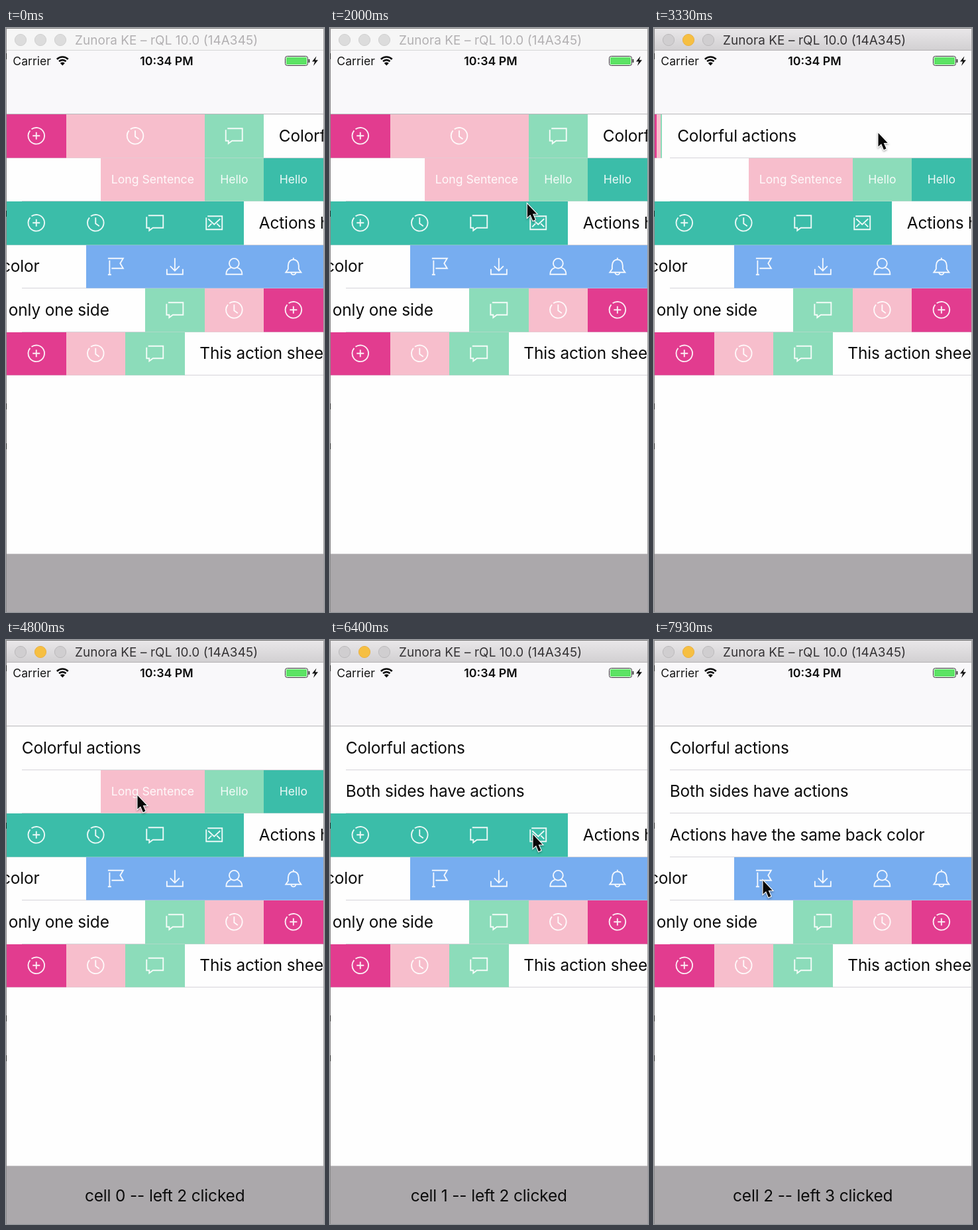
An HTML page with a canvas that plays this animation: 480 px wide and 879 px high, repeating every 8 s.

```html
<!DOCTYPE html>
<html lang="en">
<head>
<meta charset="utf-8">
<title>Swipe actions</title>
<style>
  html, body { margin: 0; width: 100%; height: 100%; overflow: hidden; background: #fff; }
  canvas { display: block; width: 480px; height: 879px; }
</style>
</head>
<body>
<canvas id="stage"></canvas>
<script>
const W = 480, H = 879, LOOP = 8000;
const canvas = document.getElementById('stage');
const ctx = canvas.getContext('2d');
const ratio = window.devicePixelRatio || 1;
canvas.width = W * ratio;
canvas.height = H * ratio;

const FONT = 'Inter, Roboto, sans-serif';
const LEFT = 1, RIGHT = 478.6, ROW_TOP = 130, ROW_H = 65.5, UNIT = 89.5;
const MAGENTA = '#e23c8f', PINK = '#f7becc', GREEN = '#8cdcba', TEAL = '#3bbda9', BLUE = '#77adf0';
const INK = 'rgba(255,255,255,0.9)';
const FOCUS_AT = 3000;

const btn = (color, face, width = UNIT) => ({ color, face, width });
const SAME = 'Actions have the same back color';
const ONE_SIDE = 'This action sheet has only one side';
const rows = [
  { text: 'Colorful actions', side: 1, closeAt: 3030,
    buttons: [btn(MAGENTA, 'plus'), btn(PINK, 'clock', 209), btn(GREEN, 'chat')] },
  { text: 'Both sides have actions', side: -1, closeAt: 4870,
    buttons: [btn(PINK, 'Long Sentence', 156.5), btn(GREEN, 'Hello'), btn(TEAL, 'Hello')] },
  { text: SAME, side: 1, closeAt: 6600,
    buttons: ['plus', 'clock', 'chat', 'mail'].map(f => btn(TEAL, f)) },
  { text: SAME, side: -1,
    buttons: ['flag', 'download', 'person', 'bell'].map(f => btn(BLUE, f)) },
  { text: ONE_SIDE, side: -1,
    buttons: [btn(GREEN, 'chat'), btn(PINK, 'clock'), btn(MAGENTA, 'plus')] },
  { text: ONE_SIDE, side: 1,
    buttons: [btn(MAGENTA, 'plus'), btn(PINK, 'clock'), btn(GREEN, 'chat')] }
];

// time, x, y of the pointer; eased between stops
const pointer = [
  [690, 236, 824], [870, 256, 570], [1140, 262, 359], [1450, 262, 359],
  [2600, 338.5, 158], [3430, 338.5, 158], [4600, 198.5, 234], [5250, 198.5, 234],
  [6250, 306.5, 293], [6950, 306.5, 293], [7850, 164.5, 362], [LOOP, 164.5, 362]
];

const messages = [
  [3530, 'cell 0 -- left 2 clicked'],
  [5370, 'cell 1 -- left 2 clicked'],
  [7100, 'cell 2 -- left 3 clicked']
];

function rect(x, y, w, h, color) {
  ctx.fillStyle = color;
  ctx.fillRect(x, y, w, h);
}

function text(str, x, y, size, color, { align = 'left', weight = 400, spacing = 0 } = {}) {
  ctx.font = `${weight} ${size}px ${FONT}`;
  ctx.letterSpacing = spacing + 'px';
  ctx.textAlign = align;
  ctx.textBaseline = 'alphabetic';
  ctx.fillStyle = color;
  ctx.fillText(str, x, y);
}

const bodyText = (str, x, y, align) => text(str, x, y, 24.4, '#0b0b0b', { align, spacing: -0.14 });

function poly(...pts) {
  pts.forEach(([x, y], i) => i ? ctx.lineTo(x, y) : ctx.moveTo(x, y));
}

function arc(x, y, r, from = 0, to = 2 * Math.PI) {
  ctx.moveTo(x + r * Math.cos(from), y + r * Math.sin(from));
  ctx.arc(x, y, r, from, to);
}

const ring = () => arc(0, 0, 12.3, -2.2, 3.85);

const icons = {
  plus() {
    ring();
    poly([-5.5, 0], [5.5, 0]);
    poly([0, -5.5], [0, 5.5]);
  },
  clock() {
    ring();
    poly([0, -8], [0, 1], [5.5, 5]);
  },
  chat() {
    poly([-10, -11], [12.5, -11], [12.5, 7.5], [-3, 7.5], [-8.5, 11.5], [-8.5, 7.5], [-12.5, 7.5], [-12.5, -9]);
  },
  mail() {
    poly([-10, -10], [12, -10], [12, 10], [-12, 10], [-12, -8]);
    poly([-9, -6], [0, 2.5], [9, -6]);
    poly([-9, 6], [-4, 1]);
    poly([9, 6], [4, 1]);
  },
  flag() {
    poly([-11.5, -12], [11.5, -12], [7, -4.5], [11.5, 3], [-6, 3]);
    poly([-9, -9], [-9, 12.5]);
    poly([-11.5, 12.5], [-6.5, 12.5]);
  },
  download() {
    poly([0, -12.5], [0, 6]);
    poly([-7, -0.5], [0, 6.5], [7, -0.5]);
    poly([-12, 4], [-12, 12], [12, 12], [12, 4]);
  },
  person() {
    arc(0, -4.5, 7.4);
    ctx.moveTo(-5, 2);
    ctx.quadraticCurveTo(-12, 4, -12, 12);
    ctx.lineTo(12, 12);
    ctx.quadraticCurveTo(12, 4, 5, 2);
  },
  bell() {
    ctx.moveTo(-8, -1);
    ctx.bezierCurveTo(-8, -13.5, 8, -13.5, 8, -1);
    poly([8, -1], [8, 4], [11.5, 9], [-11.5, 9], [-8, 4], [-8, -1]);
    poly([0, -13], [0, -10.5]);
    arc(0, 9, 3.6, 0, Math.PI);
  }
};

function drawFace(face, x, y) {
  if (!icons[face]) {
    text(face, x, y + 6, 17.6, INK, { align: 'center' });
    return;
  }
  ctx.save();
  ctx.translate(x, y);
  ctx.strokeStyle = INK;
  ctx.lineWidth = 1.9;
  ctx.beginPath();
  icons[face]();
  ctx.stroke();
  ctx.restore();
}

// critically damped spring: 1 = open, 0 = closed
function openness(row, t) {
  if (row.closeAt === undefined || t <= row.closeAt) return 1;
  const s = (t - row.closeAt) * 0.0179;
  return s > 9 ? 0 : (1 + s) * Math.exp(-s);
}

function drawRow(row, i, t) {
  const top = ROW_TOP + i * ROW_H, mid = top + 32.3;
  const y0 = Math.round(top), y1 = Math.round(top + ROW_H);
  const total = row.buttons.reduce((sum, b) => sum + b.width, 0);
  const open = openness(row, t);
  const lineX = i === rows.length - 1 ? LEFT : 24;
  rect(lineX, y1 - 1, W - lineX, 1, '#d5d4d9');
  bodyText(row.text, 23.8 + row.side * total * open, mid + 8.3);
  if (!open) return;

  // The outermost button lies on top of its neighbours.
  const stack = row.side > 0 ? [...row.buttons].reverse() : row.buttons;
  let reach = total;
  for (const b of stack) {
    const edge = reach * open;
    const x = row.side > 0 ? LEFT + edge - b.width : RIGHT - edge;
    const x0 = Math.round(x), x1 = Math.round(x + b.width);
    rect(x0, y0, x1 - x0, y1 - y0, b.color);
    drawFace(b.face, x + b.width / 2, mid);
    reach -= b.width;
  }
  const from = row.side > 0 ? LEFT : RIGHT - total * open;
  rect(from, y1 - 1, total * open, 1, 'rgba(213,212,217,0.45)');
}

function drawTitleBar(active) {
  let fill = '#f6f6f6';
  if (active) {
    fill = ctx.createLinearGradient(0, 1, 0, 33);
    fill.addColorStop(0, '#e9e7e9');
    fill.addColorStop(1, '#d2d0d2');
  }
  rect(0, 1, W, 32, fill);
  rect(0, 33, W, 1, active ? '#b4b2b4' : '#d6d6d6');
  [22, 52, 82].forEach((x, i) => {
    const lit = active && i === 1;
    ctx.beginPath();
    arc(x, 18, 8.6);
    ctx.fillStyle = lit ? '#f6bf42' : active ? '#d0ced0' : '#dcdcdc';
    ctx.fill();
    ctx.strokeStyle = lit ? '#e9b145' : active ? '#bcbabc' : '#d0d0d0';
    ctx.lineWidth = 1;
    ctx.stroke();
  });
  text('Zunora KE – rQL 10.0 (14A345)', 104, 25.3, 18.9, active ? '#343234' : '#b2b0b2', { spacing: 0.1 });
}

function drawStatus() {
  text('Carrier', 10.3, 56, 17.6, '#161616');
  text('10:34 PM', 242.5, 56, 17.8, '#0c0c0c', { align: 'center', weight: 600 });

  ctx.strokeStyle = '#0c0c0c';
  ctx.lineWidth = 2.6;
  ctx.beginPath();
  for (const r of [7.4, 12]) arc(85.3, 55.5, r, -2.35, -0.79);
  ctx.stroke();
  ctx.beginPath();
  ctx.moveTo(85.3, 56.5);
  ctx.arc(85.3, 56.5, 5, -2.35, -0.79);
  ctx.fillStyle = '#0c0c0c';
  ctx.fill();

  ctx.lineWidth = 1;
  ctx.strokeStyle = '#333';
  ctx.beginPath();
  ctx.roundRect(421.5, 42.5, 34, 14, 3);
  ctx.stroke();
  ctx.fillStyle = '#5ce364';
  ctx.beginPath();
  ctx.roundRect(423, 44, 31, 11, 1.5);
  ctx.fill();
  rect(456.6, 47, 1.8, 5, '#333');

  ctx.fillStyle = '#111';
  ctx.beginPath();
  poly([468.5, 42.5], [462, 50.5], [466, 50.5], [464, 57], [471, 48.3], [466.8, 48.3]);
  ctx.fill();
}

function drawFrame() {
  rect(0, 0, W, 1, '#777');
  rect(0, 0, 1, H, '#8b898b');
  rect(479, 0, 1, H, '#a3a1a3');
  for (const y of [38, 275, 565, 625]) rect(0, y, 1, 9, '#2b2b2b');
}

function drawPointer(t) {
  const next = pointer.findIndex(p => p[0] > t);
  if (next < 1) return;
  const [t0, x0, y0] = pointer[next - 1], [t1, x1, y1] = pointer[next];
  const u = (t - t0) / (t1 - t0);
  const k = next === 1 ? u : next === 2 ? u * (2 - u) : u * u * (3 - 2 * u);
  ctx.save();
  ctx.translate(x0 + (x1 - x0) * k, y0 + (y1 - y0) * k);
  ctx.beginPath();
  poly([0, 0], [0, 20.5], [4.6, 16.2], [8.4, 25.2], [12, 23.6], [8.2, 14.9], [14.2, 14.9]);
  ctx.closePath();
  ctx.shadowColor = 'rgba(0,0,0,0.35)';
  ctx.shadowBlur = 3 * ratio;
  ctx.shadowOffsetY = 1.5 * ratio;
  ctx.strokeStyle = '#fff';
  ctx.lineWidth = 2.2;
  ctx.stroke();
  ctx.shadowColor = 'transparent';
  ctx.fillStyle = '#080808';
  ctx.fill();
  ctx.restore();
}

function render(t) {
  ctx.setTransform(ratio, 0, 0, ratio, 0, 0);
  rect(0, 0, W, H, '#fefefe');
  rect(0, 34, W, 95, '#f9f8fa');
  rect(0, 129, W, 1, '#b9b8bb');
  ctx.save();
  ctx.beginPath();
  ctx.rect(LEFT, ROW_TOP, W - LEFT, rows.length * ROW_H + 1);
  ctx.clip();
  rows.forEach((row, i) => drawRow(row, i, t));
  ctx.restore();

  rect(0, 791.5, W, H - 791.5, '#aba8ab');
  const shown = messages.filter(m => t >= m[0]).pop();
  if (shown) bodyText(shown[1], 239.7, 844.5, 'center');

  drawTitleBar(t >= FOCUS_AT);
  drawStatus();
  drawFrame();
  drawPointer(t);
}

const start = performance.now();
function tick() {
  render((performance.now() - start) % LOOP);
  requestAnimationFrame(tick);
}
tick();
</script>
</body>
</html>
```
